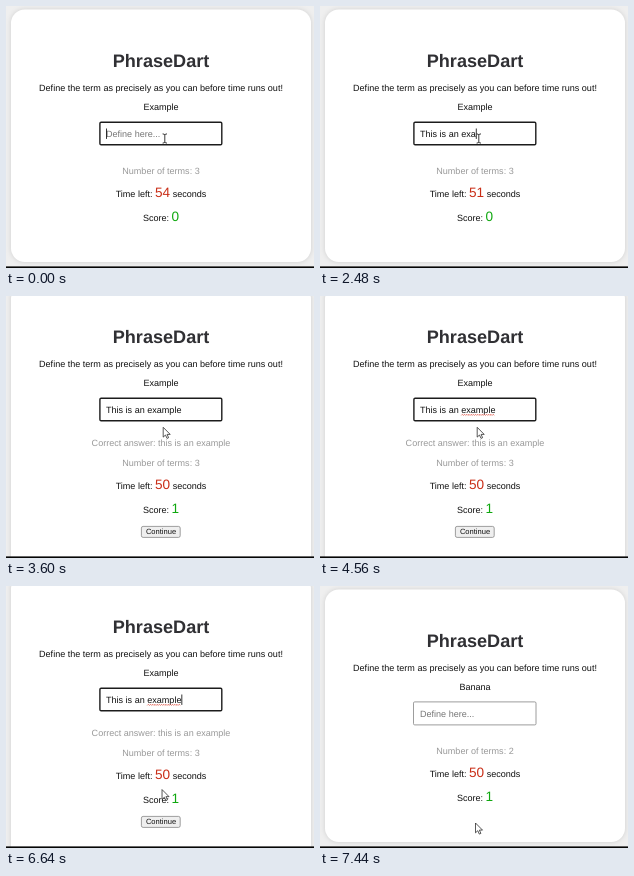
Recreate the animation shown at these times as an HTML page. Size 308x262 px, loop 8000 ms.

```html
<!DOCTYPE html>
<html lang="en">
<head>
<meta charset="utf-8">
<title>PhraseDart</title>
<style>
  html, body { margin: 0; width: 100%; height: 100%; overflow: hidden; background: #efefef; }
  svg { display: block; width: 308px; height: 262px; }
  text { font: 9.05px "Liberation Sans", Arial, sans-serif; text-rendering: geometricPrecision; fill: #111; white-space: pre; }
  .mid { text-anchor: middle; }
  .title { font-size: 18.1px; font-weight: bold; fill: #303034; }
  .soft { fill: #999; }
  .big { font-size: 13.6px; }
  #left { fill: #c92d16; }
  #score { fill: #0fa80f; }
  #card { fill: #fff; filter: drop-shadow(0 0 2.5px rgba(0, 0, 0, .13)); }
  #box { fill: #fff; }
  #caret { fill: #000; }
  #squiggle { fill: none; stroke: #dd4433; stroke-width: .7; }
  #button { fill: #efefef; stroke: #777; stroke-width: .7; }
  .label { font-size: 7.55px; }
  #arrow { fill: #fff; stroke: #222; stroke-width: .75; stroke-linejoin: round; }
  #beam { fill: none; stroke: #222; stroke-width: .9; }
</style>
</head>
<body>
<svg viewBox="0 0 308 262">
  <rect width="308" height="262" fill="#efefef"/>
  <rect id="card" x="5" width="300" rx="14"/>

  <g id="upper">
    <text class="mid title" x="155" y="60.6">PhraseDart</text>
    <text class="mid" x="155" y="85">Define the term as precisely as you can before time runs out!</text>
    <text class="mid" id="term" x="155" y="104.3"></text>
    <rect id="box" rx="1.2"/>
    <text id="entry" x="100" y="130.9"></text>
    <path id="squiggle"/>
    <rect id="caret" y="122.5" width=".8" height="10.4"/>
  </g>

  <g id="extra">
    <text class="mid soft" x="155" y="150.4">Correct answer: this is an example</text>
    <rect id="button" x="135.4" y="230.4" width="38.8" height="11" rx="1.7"/>
    <text class="mid label" x="155" y="238.4">Continue</text>
  </g>

  <g id="lower">
    <text class="mid soft" x="155" y="167.8">Number of terms: <tspan id="count"></tspan></text>
    <text class="mid" x="155" y="190.9">Time left: <tspan class="big" id="left"></tspan> seconds</text>
    <text class="mid" x="155" y="215.3">Score: <tspan class="big" id="score"></tspan></text>
  </g>

  <path id="beam" d="M156.6 127.9q2 0 2.2 1.1q.2 -1.1 2.2 -1.1M158.8 128.8v7.4M156.6 137.1q2 0 2.2 -1.1q.2 1.1 2.2 1.1"/>
  <path id="arrow" d="M0 0V9.8L2.3 7.7L3.8 11.1L5.4 10.4L3.9 7.1H7Z"/>
  <rect y="260.4" width="308" height="1.6" fill="#050505"/>
</svg>
<script>
const LOOP = 8000, STEP = 80;
const ANSWER = "This is an example";
// moment at which each letter of the answer is typed
const KEYS = [240, 480, 640, 720, 880, 1120, 1200, 1280, 1440, 1600, 1680,
              1920, 2160, 2400, 2560, 2720, 2880, 2960];
const TICKS = [480, 1440, 2480, 3440];
const BLINKS = [3440, 4080, 4560, 5120, 5680, 6160, 6720];
const SUBMIT = 3600, SPELL = 4080, MOVE = 6320, HOVER = 6800, PRESS = 7200, NEXT = 7440;

const $ = id => document.getElementById(id);
const passed = (times, t) => times.filter(k => k <= t).length;
const show = (id, on) => $(id).setAttribute("visibility", on ? "visible" : "hidden");
const write = (id, value) => { if ($(id).textContent !== String(value)) $(id).textContent = value; };
const attrs = (id, values) => {
  for (const name in values) $(id).setAttribute(name, values[name]);
};

const pen = document.createElement("canvas").getContext("2d");
pen.font = '100px "Liberation Sans", Arial, sans-serif';
const widthOf = text => pen.measureText(text).width * .0905;

attrs("squiggle", { d: "M141.3 133.4" + "l1.1 -1.1l1.1 1.1".repeat(15) });

function drawInput(t) {
  const typed = t < NEXT ? ANSWER.slice(0, passed(KEYS, t)) : "";
  const focused = t < PRESS;
  write("entry", typed || "Define here...");
  $("entry").style.fill = typed ? "#111" : "#757575";
  attrs("caret", { x: 100 + widthOf(typed) });
  show("caret", focused && passed(BLINKS, t) % 2 === 0);
  show("squiggle", t >= SPELL && focused);
  attrs("box", focused
    ? { x: 93.9, y: 116.2, width: 121.9, height: 22.5, stroke: "#1c1c1c", "stroke-width": 1.4 }
    : { x: 93.5, y: 115.9, width: 122.5, height: 23, stroke: "#858585", "stroke-width": .8 });
}

function drawPointer(t) {
  const p = Math.min(1, Math.max(0, (t - MOVE + STEP) / (8 * STEP)));
  const ease = p * p * (3 - 2 * p);
  attrs("arrow", { transform: `translate(${157.2 - 1.7 * ease} ${131.3 + 105.7 * ease})` });
  show("arrow", t >= SUBMIT);
  show("beam", t < SUBMIT);
}

function draw(t) {
  const answered = t >= SUBMIT && t < NEXT;
  attrs("card", { y: answered ? -10.5 : 3.5, height: answered ? 290 : 252.5 });
  attrs("upper", { transform: `translate(0 ${answered ? -14 : 0})` });
  attrs("lower", { transform: `translate(0 ${answered ? 2.1 : 0})` });
  show("extra", answered);
  write("term", t < NEXT ? "Example" : "Banana");
  write("count", t < NEXT ? 3 : 2);
  write("left", 54 - passed(TICKS, t));
  write("score", t < SUBMIT ? 0 : 1);
  $("button").style.fill = t >= HOVER && t < PRESS ? "#e5e5e5" : "#efefef";
  drawInput(t);
  drawPointer(t);
}

const start = performance.now();
function frame() {
  const t = (performance.now() - start) % LOOP;
  draw(Math.floor(t / STEP) * STEP);
  requestAnimationFrame(frame);
}
draw(0);
requestAnimationFrame(frame);
</script>
</body>
</html>
```
